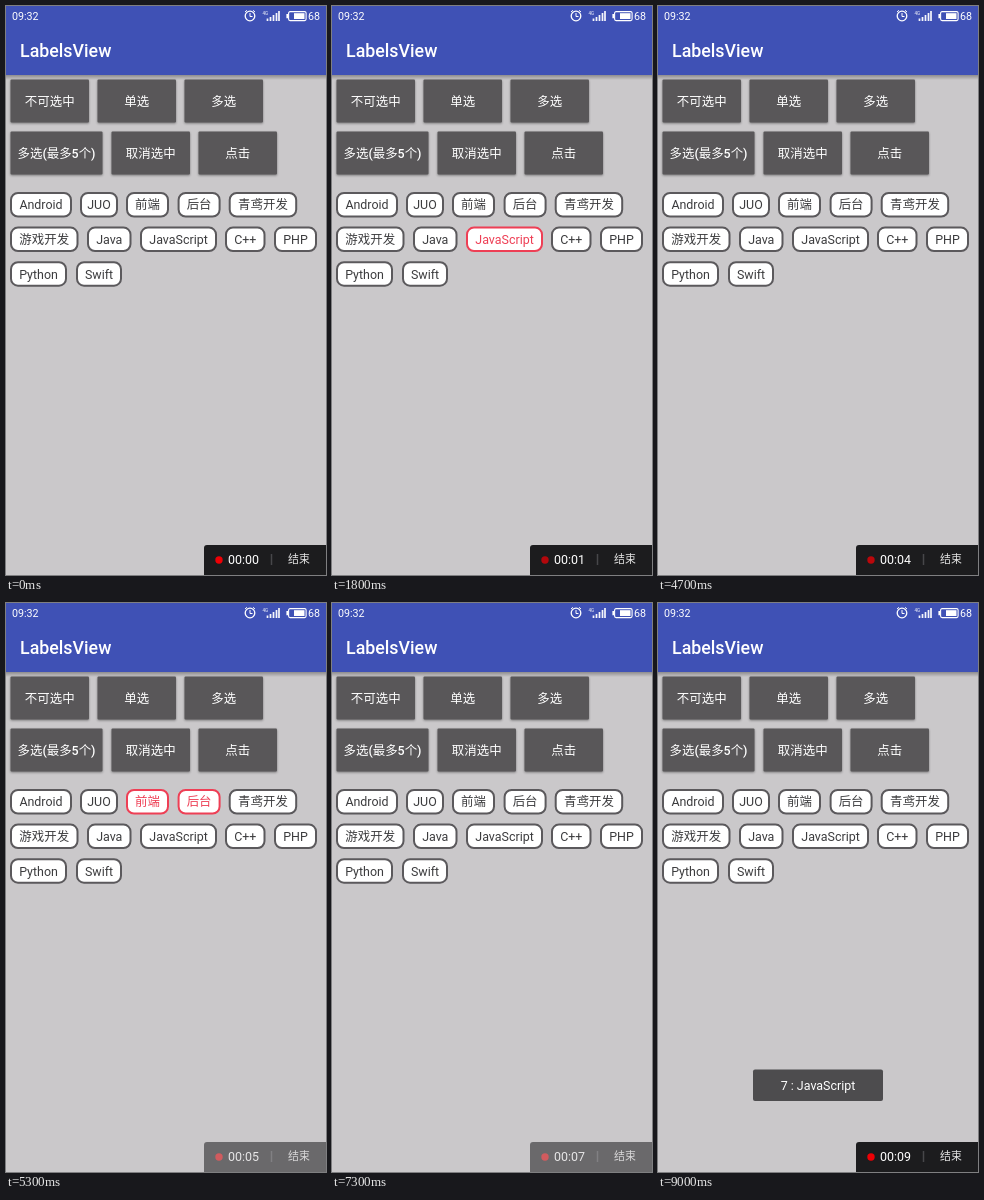
Animation of 320 by 569 pixels, one loop 9.1 s. Source, as an HTML page:

```html
<!DOCTYPE html>
<html lang="zh-CN">
<head>
<meta charset="utf-8">
<title>LabelsView</title>
<style>
html, body { margin: 0; width: 100%; height: 100%; overflow: hidden; background: #cac8ca; }
svg { display: block; width: 100%; height: 100%; }
text { font: 12.44px Roboto, "Noto Sans CJK SC", "Noto Sans CJK", sans-serif; fill: #fff; }
.mid text { text-anchor: middle; }
#buttons text { font-weight: 500; }
#buttons rect { fill: #595759; filter: drop-shadow(0 1px 1px #0006); }
#buttons .pressed rect { filter: drop-shadow(0 2px 2px #0008); }
#chips rect { fill: #fff; stroke: #5b595c; stroke-width: 2; }
#chips text { fill: #3c3c3e; }
#chips .on rect { stroke: #ee3f55; }
#chips .on text { fill: #ee3f55; }
</style>
</head>
<body>
<svg viewBox="0 0 320 569">
  <defs>
    <linearGradient id="shade" x2="0" y2="1">
      <stop stop-opacity=".3"/><stop offset="1" stop-opacity="0"/>
    </linearGradient>
    <clipPath id="cancelClip"><rect x="105.5" y="125.5" width="78.5" height="43"/></clipPath>
    <clipPath id="clickClip"><rect x="192.5" y="125.5" width="78.5" height="43"/></clipPath>
  </defs>
  <rect width="320" height="569" fill="#cac8ca"/>
  <rect y="69" width="320" height="5" fill="url(#shade)"/>
  <rect width="320" height="69" fill="#3f51b5"/>

  <g id="status" fill="none" stroke="#fff">
    <circle cx="244" cy="10" r="4.8" stroke-width="1.3"/>
    <path d="M244 7V10.5H246.5M239 6L241 4.3M249 6L247 4.3"/>
    <path d="M261.5 15V12.5M264.5 15V11M267.5 15V9M270.5 15V7M273 15V5" stroke-width="1.7" stroke-opacity=".95"/>
    <rect x="282.6" y="5.6" width="17.5" height="9" rx="1.5" stroke-width="1.1"/>
    <path d="M281.2 8V12.2" stroke-width="1.6"/>
    <rect x="288" y="7.2" width="10.5" height="5.8" fill="#fff" stroke="none"/>
  </g>
  <text x="6" y="14" style="font-size:10.7px">09:32</text>
  <text x="256.5" y="8.5" style="font-size:4.5px">4G</text>
  <text x="302" y="14" style="font-size:10.7px">68</text>
  <text x="14" y="51.4" style="font-size:17.8px;font-weight:500">LabelsView</text>

  <g id="buttons" class="mid"></g>
  <g fill="#fff">
    <circle id="cancelRipple" cx="146" cy="148" clip-path="url(#cancelClip)"/>
    <circle id="clickRipple" cx="232" cy="148" clip-path="url(#clickClip)"/>
  </g>
  <g id="chips" class="mid"></g>

  <g id="toast" class="mid">
    <rect x="95" y="466.5" width="130" height="31.5" rx="2" fill="#4d4c4e"/>
    <text x="160" y="487">7 : JavaScript</text>
  </g>

  <g id="recorder">
    <path d="M198 569V542Q198 539 201 539H320V569Z" fill="#1c1c1e"/>
    <circle id="dot" cx="213" cy="554" r="3.7" fill="#ee0005"/>
    <text id="clock" x="222" y="558"></text>
    <path d="M265.5 548V559" stroke="#47474a" stroke-width="1.5"/>
    <text x="282" y="557.3" style="font-size:10.9px;fill:#e4e4e4">结束</text>
  </g>
</svg>
<script>
const $ = id => document.getElementById(id);
const clamp = v => Math.max(0, Math.min(1, v));
const ramp = (t, from, to) => clamp((t - from) / (to - from));

const buttons = [
  ["不可选中", 4.5, 73.5, 78.5], ["单选", 91.5, 73.5, 78.5], ["多选", 178.5, 73.5, 78.5],
  ["多选(最多5个)", 4.5, 125.5, 92], ["取消选中", 105.5, 125.5, 78.5], ["点击", 192.5, 125.5, 78.5]
];
const chips = [
  ["Android", 5, 0, 60], ["JUO", 75, 0, 36], ["前端", 121, 0, 41], ["后台", 172.6, 0, 41], ["青鸢开发", 223.7, 0, 66.5],
  ["游戏开发", 5, 1, 66.5], ["Java", 82, 1, 42.5], ["JavaScript", 135, 1, 75], ["C++", 220, 1, 38.5], ["PHP", 269, 1, 41],
  ["Python", 5, 2, 55], ["Swift", 71, 2, 44]
];
// [item, start ms, end ms]
const selections = [
  [2, 1200, 1700], [7, 1700, 2500], [1, 2500, 3700],
  [2, 4900, 6400], [3, 5300, 6400], [7, 5700, 6400]
];
const presses = [[1, 500, 800], [2, 3600, 3900], [4, 6300, 6600], [5, 6900, 7200]];

const box = (label, x, y, w, h, r, base) =>
  `<g><rect x="${x}" y="${y}" width="${w}" height="${h}" rx="${r}"/><text x="${x + w / 2}" y="${y + base}">${label}</text></g>`;
$("buttons").innerHTML = buttons.map(([s, x, y, w]) => box(s, x, y, w, 43, 1, 26.3)).join("");
$("chips").innerHTML = chips.map(([s, x, row, w]) => box(s, x, 187 + row * 34.6, w, 23.5, 7, 16.4)).join("");

function mark(group, name, spans, t) {
  [...$(group).children].forEach((el, i) =>
    el.classList.toggle(name, spans.some(([k, a, b]) => k === i && t >= a && t < b)));
}

function ripple(id, t, start) {
  const age = t - start;
  $(id).setAttribute("r", age < 0 ? 0 : Math.min(46, age * 0.27));
  $(id).setAttribute("opacity", 0.1 * (1 - ramp(age, 150, 400)));
}

function draw(now) {
  const t = now % 9100;
  mark("chips", "on", selections, t);
  mark("buttons", "pressed", presses, t);
  ripple("cancelRipple", t, 6300);
  ripple("clickRipple", t, 6900);
  $("toast").setAttribute("opacity", ramp(t, 7880, 8270));
  $("recorder").setAttribute("opacity", t < 8700 ? 1 - 0.45 * ramp(t, 4800, 5200) : 1);
  $("dot").setAttribute("opacity", 1 - 0.35 * (t % 1000) / 1000);
  $("clock").textContent = "00:0" + Math.floor(t / 1000);
}

const begin = performance.now();
function tick() {
  draw(performance.now() - begin);
  requestAnimationFrame(tick);
}
tick();
</script>
</body>
</html>
```
